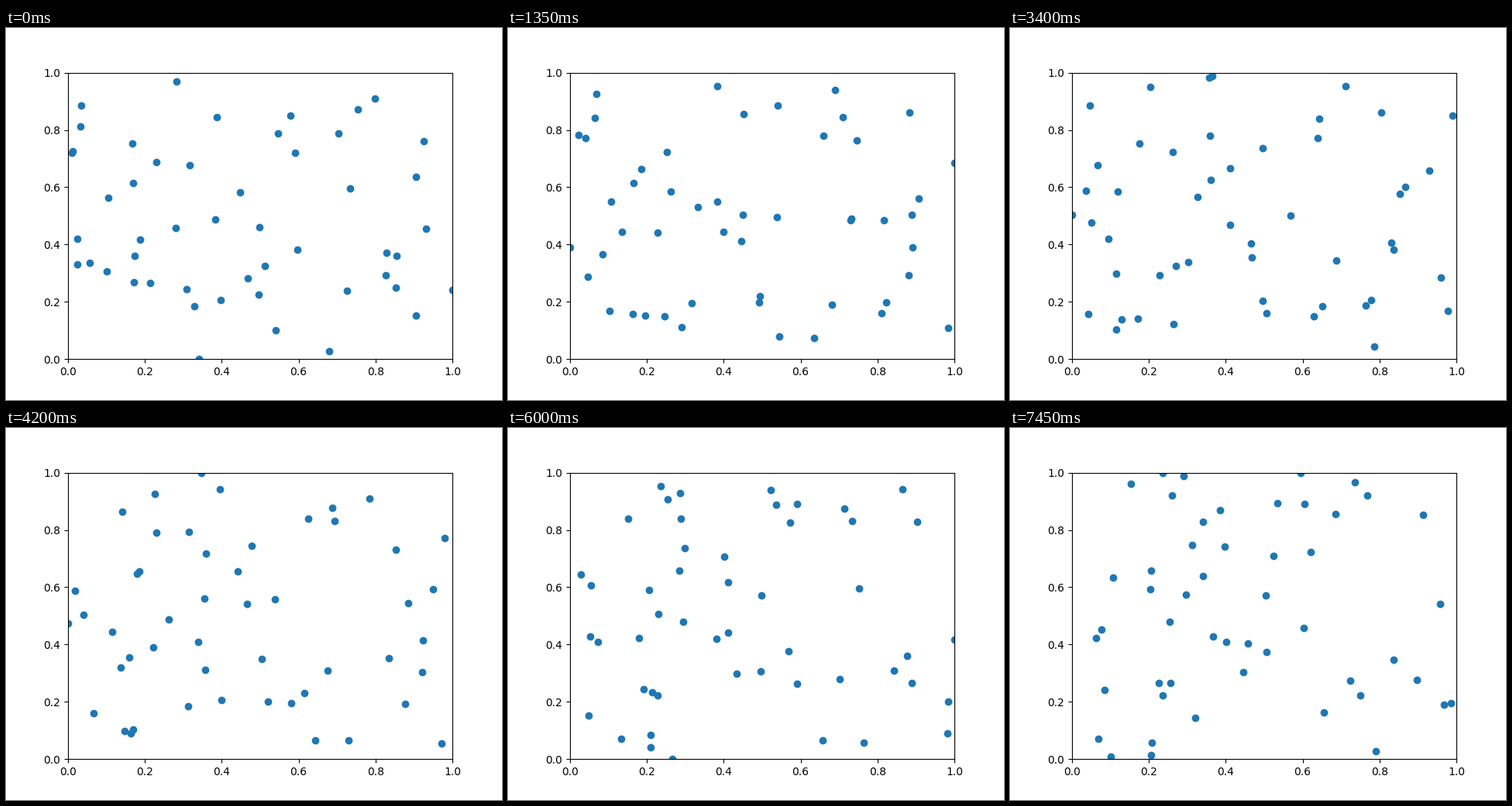
Write a matplotlib script that moves like this. It is 640x480 px and loops after 7.5 s.

```python
import numpy as np
import matplotlib.pyplot as plt
from matplotlib.animation import FuncAnimation

FRAMES = 150
INTERVAL = 50
STEP = 0.025

# Starting points as (x, y) in thousandths of the axes
START = np.array([
    (283, 970), (35, 885), (33, 812), (10, 720), (13, 725),
    (388, 845), (579, 850), (547, 788), (591, 720), (704, 788),
    (754, 872), (798, 910), (926, 760), (906, 636), (734, 595),
    (168, 753), (230, 688), (317, 677), (170, 615), (105, 563),
    (447, 582), (383, 487), (498, 460), (281, 458), (188, 417),
    (174, 360), (25, 420), (25, 330), (57, 336), (101, 306),
    (172, 268), (214, 265), (309, 244), (329, 184), (398, 206),
    (341, 0), (468, 281), (496, 225), (512, 325), (597, 381),
    (541, 100), (680, 27), (726, 238), (829, 371), (855, 360),
    (827, 292), (853, 249), (932, 455), (906, 152), (1000, 241),
]) / 1000


def random_walk(start, count, seed=7):
    """Uniform random steps, held inside the unit square."""
    rng = np.random.default_rng(seed)
    path = [start]
    for _ in range(count - 1):
        move = rng.uniform(-STEP, STEP, start.shape)
        path.append(np.clip(path[-1] + move, 0, 1))
    return path


path = random_walk(START, FRAMES)

fig, ax = plt.subplots(figsize=(6.4, 4.8), dpi=100)
ax.set_xlim(0, 1)
ax.set_ylim(0, 1)
dots = ax.scatter(*START.T)


def update(i):
    dots.set_offsets(path[i])
    return (dots,)


anim = FuncAnimation(fig, update, frames=FRAMES, interval=INTERVAL,
                     repeat=True, repeat_delay=0)
plt.show()
```
